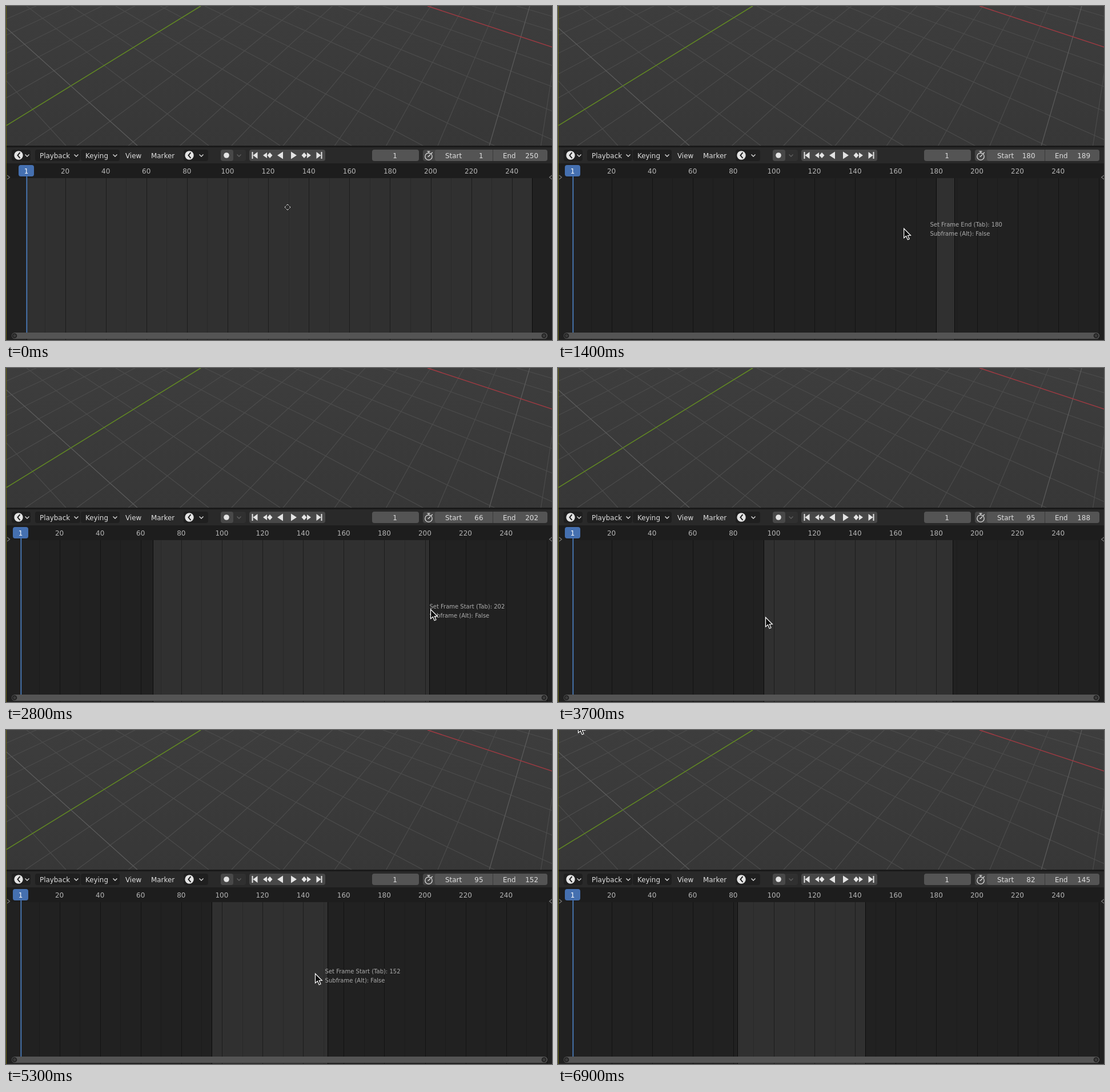
Recreate the animation shown at these times as an HTML page. Size 956 by 586 pixels, loop 7000 ms.

```html
<!DOCTYPE html>
<html lang="en">
<head>
<meta charset="utf-8">
<title>Frame range</title>
<style>
html, body { margin: 0; width: 100%; height: 100%; overflow: hidden; background: #303030; }
svg { display: block; width: 956px; height: 586px; }
text { font: 11.9px "DejaVu Sans", sans-serif; fill: #dedede; white-space: pre; }
.mid { text-anchor: middle; }
.end { text-anchor: end; }
.ruler text { font-size: 12px; fill: #b4b4b4; }
.pie text { font-size: 11.8px; fill: #e2e2e2; }
.pie .dim { fill: #858585; }
.pie .title { fill: #a2a2a2; }
.key { text-decoration: underline; text-underline-offset: 2px; }
.tip text { font-size: 10px; fill: #adadad; }
.line { fill: none; stroke: #dedede; stroke-width: 1.3; }
.icon { fill: #e4e4e4; }
</style>
</head>
<body>
<svg viewBox="0 0 956 586">
  <defs>
    <linearGradient id="sky" x2="0" y2="1">
      <stop stop-color="#3d3d3d"/><stop offset="1" stop-color="#373737"/>
    </linearGradient>
    <clipPath id="view"><rect width="956" height="246"/></clipPath>
  </defs>
  <rect width="956" height="246" fill="url(#sky)"/>
  <g id="grid" clip-path="url(#view)"></g>
  <rect y="302" width="956" height="284" fill="#303030"/>
  <g id="time"></g>
  <g id="bars"></g>
  <g id="pie" class="pie"></g>
  <g id="tip" class="tip"><text id="tipMode" y="4"/><text id="tipSub" y="19.5">Subframe (Alt): False</text></g>
  <path id="arrow" d="M.5 .5V17L4.4 13.6L7.2 20L10 18.7L7.3 12.5H12.3Z" fill="#0c0c0c" stroke="#fff" stroke-width="1.2"/>
  <path id="pan" d="M-2-3L0-5L2-3M-2 3L0 5L2 3M-3-2L-5 0L-3 2M3-2L5 0L3 2" fill="#111" stroke="#e8e8e8"/>
</svg>
<script>
const $ = id => document.getElementById(id);
const frameX = f => 22.445 + 3.555 * f;
const frameAt = x => Math.floor((x - 22.445) / 3.555);

const rect = (x, y, w, h, fill, r = 0, more = '') =>
  `<rect x="${x}" y="${y}" width="${w}" height="${h}" rx="${r}" fill="${fill}" ${more}/>`;
const text = (x, y, s, cls = '', more = '') => `<text x="${x}" y="${y}" class="${cls}" ${more}>${s}</text>`;
const line = (x1, y1, x2, y2, color, w = 1) =>
  `<path d="M${x1} ${y1}L${x2} ${y2}" stroke="${color}" stroke-width="${w}"/>`;
const icon = (d, x = 0, y = 262, cls = 'icon') => `<path class="${cls}" d="${d}" transform="translate(${x} ${y})"/>`;
const chevron = x => icon('M-3.5-1.5L0 2L3.5-1.5', x, 262, 'line');
const clock = (x, y) => `<circle cx="${x}" cy="${y}" r="7.7" fill="#e4e4e4"/>` +
  `<path d="M${x + 2.5} ${y - 5}L${x - 1.5} ${y}L${x + 2.5} ${y + 5}" fill="none" stroke="#1b1b1b" stroke-width="2"/>`;
const stopwatch = (x, y) =>
  icon('M6.2 2A6.2 6.2 0 1 1-6.2 2A6.2 6.2 0 1 1 6.2 2M-2.5-6.8H2.5M0-6.8V-4M4.5-3L6.8-5.3M0 2L3-1.5M0 2H-1.5', x, y, 'line');

function drawGrid() {
  let minor = '', major = '';
  // Each family is evenly spaced along any horizontal, so two edges define it.
  const add = (i, top, bottom, axis) => {
    const s = line(top, 0, bottom, 246, i ? (i % 10 ? '#4b4b4b' : '#5c5c5c') : axis, i ? 1.2 : 1.5);
    if (i % 10) minor += s; else major += s;
  };
  for (let i = -9; i < 13; i++) add(i, 341 + 57.6 * i, -58 + 90.4 * i, '#628a22');
  for (let i = -3; i < 15; i++) add(i, 738 - 78 * i, 1483 - 125.2 * i, '#a03a42');
  $('grid').innerHTML = minor + major;
}

function drawTime() {
  let lines = '', labels = '';
  for (let f = 10; f <= 260; f += 10) {
    const x = Math.round(frameX(f) + .1) + .5, big = f % 20 === 0;
    lines += line(x, 302, x, 586, `rgba(0,0,0,${big ? .4 : .13})`);
    if (big && f < 260) labels += text(frameX(f), 294, f, 'mid');
  }
  const shade = id => rect(0, 302, 0, 284, '#212121', 0, `id="${id}"`);
  const edge = id => rect(0, 302, 1, 284, '#0c0c0c', 0, `id="${id}"`);
  $('time').innerHTML = shade('before') + shade('after') + lines + edge('startEdge') + edge('endEdge') +
    rect(-20, 276, 1000, 26, '#1d1d1d') + `<g class="ruler">${labels}</g>` +
    rect(25.5, 297, 1.7, 276, '#4c80c4') + rect(12, 279, 27, 20, '#4570b0', 4) +
    text(25.5, 293.5, '1', 'mid', 'style="fill:#fff"');
}

function drawBars() {
  const play = 'M-4-6.5V6.5L6 0Z', step = 'M1-5V5L8 0ZM-4-5L-8.5 0L-4 5L.5 0Z', jump = 'M5-6H3V6H5ZM-5-6V6L3 0Z';
  const button = (x, w, fill) => rect(x, 252, w, 20, fill, 4);
  // Right-hand transport icons and their mirror images.
  const pair = (d, gap) => [1, -1].map(s =>
    `<g transform="translate(${492 + s * gap} 0) scale(${s} 1)">${icon(d)}</g>`).join('');
  const label = (x, s) => text(x, 266.5, s);
  const knob = x => `<circle cx="${x}" cy="578.5" r="3.5" fill="#3a3a3a" stroke="#1d1d1d" stroke-width="1.5"/>`;
  $('bars').innerHTML =
    rect(0, 245, 956, 3, '#1a1a1a') + rect(0, 248, 956, 28, '#292929') +
    button(10, 33, '#1f1f1f') + button(51, 79, '#1f1f1f') + button(131, 68, '#1f1f1f') + button(311, 43, '#1f1f1f') +
    button(376, 44, '#303030') + button(376, 22, '#484848') + button(426, 133, '#484848') +
    button(641, 82, '#545454') + button(730, 30, '#454545') + button(751, 197, '#545454') +
    rect(852, 252, 1, 20, '#3a3a3a') +
    clock(22, 262) + clock(321, 262) + [37, 123, 191, 342].map(chevron).join('') +
    `<g opacity=".28">${chevron(408)}</g>` +
    label(59, 'Playback') + label(139, 'Keying') + label(209, 'View') + label(254, 'Marker') +
    '<circle class="icon" cx="386" cy="262" r="4.8"/>' +
    pair(play, 11) + pair(step, 34) + pair(jump, 56.5) +
    text(681, 266.5, '1', 'mid') + stopwatch(740, 262) +
    label(769, 'Start') + label(870, 'End') +
    text(835.5, 266.5, '', 'end', 'id="startNum"') + text(932, 266.5, '', 'end', 'id="endNum"') +
    rect(10, 573, 938, 11, '#545454', 5.5) + knob(15) + knob(942) +
    '<path d="M2 297L6.5 300.5L2 304M956 297L951.5 300.5L956 304" fill="none" stroke="#777" stroke-width="1.2"/>' +
    rect(0, 0, 1, 586, '#66640f');
}

// Items sit around the ring: side -1 ends left of it, 1 starts right of it, 0 is centred.
function drawPie() {
  const item = (side, y, w, label, digit, mark) => {
    const gap = y ? 80 : 113;
    const x = side < 0 ? -gap - w : side ? gap : -w / 2;
    return `<g transform="translate(${x} ${y})">` + rect(0, -16, w, 32, '#181818', 4) +
      `<g transform="translate(18.5 0)">${mark}</g>` +
      text(34.7, 4, label.replace(/_(.)/, '<tspan class="key">$1</tspan>')) +
      text(w - 10.5, 4, digit, 'mid dim') + '</g>';
  };
  const stroke = d => icon(d, 0, 0, 'line');
  $('pie').innerHTML =
    item(0, -129, 185, 'Auto Frame Range', 8, stroke('M-7.5 4V-2H7.5V4')) +
    item(-1, -79, 251, '_Bake Keyframe (Experimental)', 7, icon('M0-6.5L6.5 0L0 6.5L-6.5 0Z', 0, 0)) +
    item(1, -79, 203, '_Randomize Keyframes', 9, stroke('M-7 6C-2 6-5-1-1-1S1-5 6-5M-6-1H-3M3-1H6')) +
    item(-1, 0, 230, '_Timescale Keyframe (Slow)', 4, clock(0, 0)) +
    item(1, 0, 173, '_Set Frame Range', 6, stopwatch(0, 0)) +
    item(0, 129, 157, 'Trim _Keyframe', 2, stroke('M-1.5-7H-7V-3H-1.5M1.5-7H7V-3H1.5M-7.5 0H-2M2 0H7.5M-1.5 7H-5V3H-1.5ZM1.5 7H5V3H1.5Z')) +
    text(0, -30.2, 'Frame Modal Operator', 'mid title') +
    '<circle r="17" fill="#303030" stroke="#1b1b1b" stroke-width="8"/>';
}

// Where the pointer turns or rests: tick (100 ms), x, y.
const path = [
  [0, 493, 353], [2, 483, 353], [5, 426, 351], [7, 426, 351], [11, 695, 372], [13, 663, 385],
  [20, 258, 420], [24, 540, 415], [26, 540, 415], [27, 741, 421], [28, 743, 423], [29, 691, 430],
  [35, 363, 437], [38, 363, 437], [43, 127, 100], [45, 414, 401], [47, 461, 401], [48, 461, 401],
  [51, 600, 412], [52, 563, 426], [53, 541, 427], [57, 314, 430], [62, 38, -8], [69, 35, -12]
];
// Each use of the operator drags the end first, then the start.
const runs = [
  { open: 5, drag: 10, swap: 13, stop: 21 },
  { open: 28, drag: 28, swap: 31, stop: 36 },
  { open: 47, drag: 50, swap: 55, stop: 58 }
];

function pointer(k) {
  const i = Math.max(1, path.findIndex(p => p[0] >= k));
  const [t0, x0, y0] = path[i - 1], [t1, x1, y1] = path[i];
  const u = (k - t0) / (t1 - t0);
  return [x0 + (x1 - x0) * u, y0 + (y1 - y0) * u];
}

// The range follows the pointer one tick late.
function range(k) {
  const lagged = t => frameAt(pointer(t - 1)[0]);
  let first = 1, last = 250;
  for (const { drag, swap, stop } of runs) {
    if (k >= drag) last = lagged(Math.min(k, swap - 1));
    if (k >= swap) first = lagged(Math.min(k, stop));
  }
  return [first, last];
}

const set = (id, name, value) => $(id).setAttribute(name, value);
const move = (id, x, y) => set(id, 'transform', `translate(${x} ${y})`);
const show = (id, on) => { $(id).style.display = on ? '' : 'none'; };

function pose(k) {
  const [x, y] = pointer(k), [first, last] = range(k);
  const x1 = Math.round(frameX(first)), x2 = Math.round(frameX(last));

  move('time', Math.max(0, 10 - 5 * k), 0);
  set('before', 'x', -20);
  set('before', 'width', x1 + 20);
  set('after', 'x', x2 + 1);
  set('after', 'width', 980 - x2);
  set('startEdge', 'x', x1);
  set('endEdge', 'x', x2);
  $('startNum').textContent = first;
  $('endNum').textContent = last;

  const run = runs.find(r => k >= r.open && k <= r.stop);
  const choosing = run && k < run.drag, dragging = run && !choosing;
  show('pie', choosing);
  show('tip', dragging);
  if (choosing) {
    const [cx, cy] = pointer(run.open);
    move('pie', cx, cy + 1);
  }
  if (dragging) {
    const [tx, ty] = pointer(k - .8), onStart = k >= run.swap;
    move('tip', tx, ty - 3);
    $('tipMode').textContent = onStart ? `Set Frame End (Tab): ${first}` : `Set Frame Start (Tab): ${last}`;
  }

  const panning = k < 2;
  show('pan', panning);
  show('arrow', !panning);
  move(panning ? 'pan' : 'arrow', x, y);
}

drawGrid();
drawTime();
drawBars();
drawPie();
const begin = performance.now();
let shown = -1;
function tick() {
  const k = Math.floor((performance.now() - begin) / 100) % 70;
  if (k !== shown) pose(shown = k);
  requestAnimationFrame(tick);
}
tick();
</script>
</body>
</html>
```
